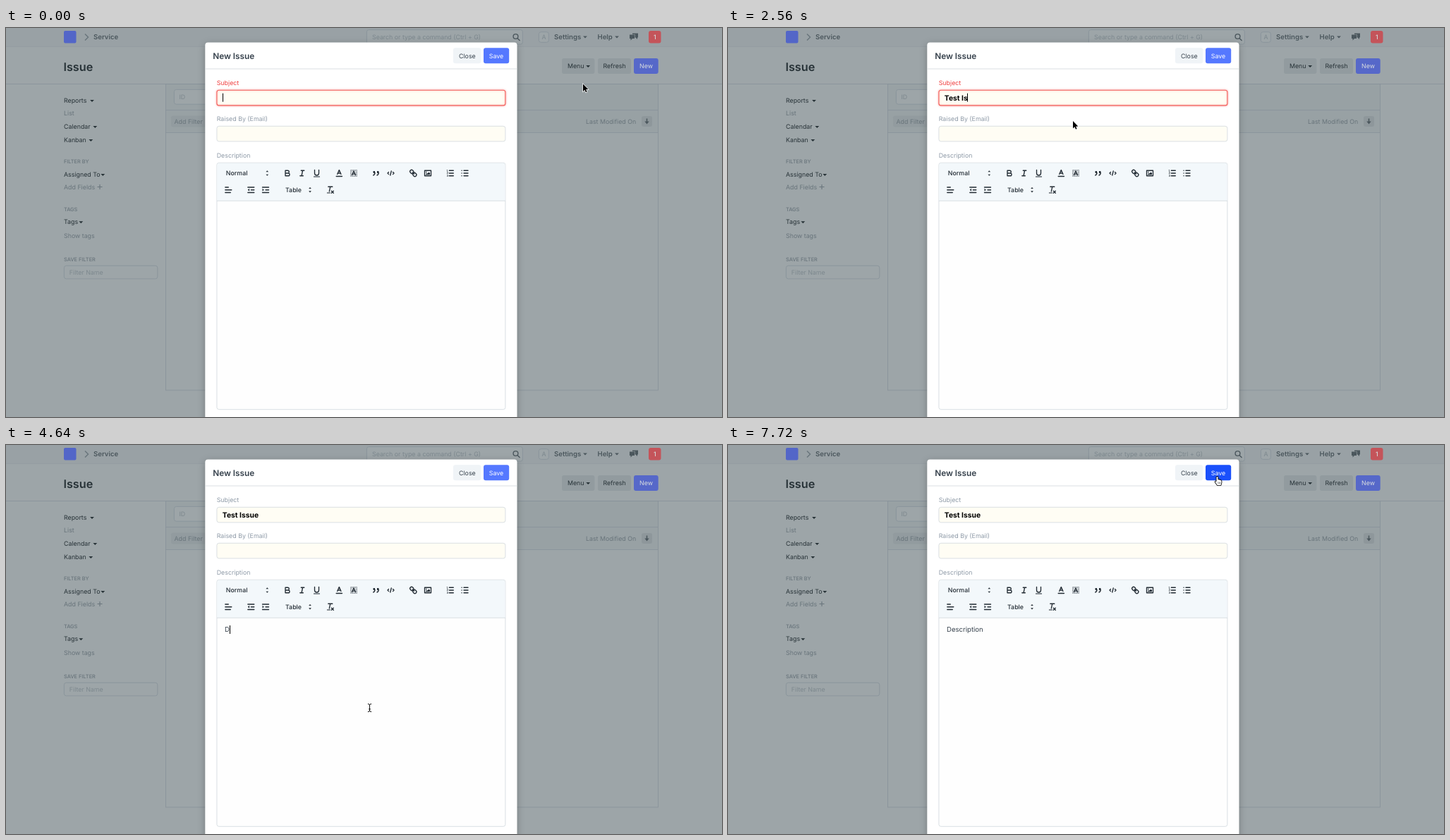
Animation, 1015 px wide and 552 px high, one loop 8000 ms. Source, as an HTML page with a canvas:

```html
<!DOCTYPE html>
<html lang="en">
<head>
<meta charset="utf-8">
<title>New Issue</title>
<style>
html, body { margin: 0; width: 100%; height: 100%; overflow: hidden; background: #9da5a8; }
canvas { display: block; width: 1015px; height: 552px; }
</style>
</head>
<body>
<canvas id="stage"></canvas>
<script>
const W = 1015, H = 552, LOOP = 8000;
const canvas = document.getElementById('stage');
const ctx = canvas.getContext('2d');
const ratio = window.devicePixelRatio || 1;
canvas.width = W * ratio;
canvas.height = H * ratio;

const SMALL = 8.84;
const DIM = { page: '#9da5a8', nav: '#99a1a5', panel: '#98a1a4', line: '#87929a', dark: '#273237',
  mid: '#4b575d', gray: '#68747b', faint: '#7d888e', button: '#929b9f' };
const INK = '#36414c', LABEL = '#8d99a6', BORDER = '#d1d8dd', RED = '#f03e3e';

// Timelines: each entry holds from its time until the next one.
const subjectLen = [[0, 0], [1070, 1], [1220, 2], [1520, 4], [1670, 5], [2410, 6], [2560, 7], [2710, 9], [2860, 10]];
const bodyLen = [[0, 0], [4640, 1], [4780, 2], [5080, 3], [5230, 4], [5370, 5], [5520, 6], [5810, 7],
  [5960, 8], [6100, 9], [6250, 10], [6550, 11]];
const caretIn = [[0, 'subject'], [300, ''], [1070, 'subject'], [2260, ''], [2410, 'subject'], [3150, ''],
  [3750, 'body'], [4190, ''], [4640, 'body'], [6840, '']];
const pointer = [[0, 818, 79.5, 'arrow'], [150, 690, 128, 'arrow'], [300, 548, 138, 'arrow'], [480, 489, 132, 'arrow'],
  [3150, 495, 190, 'arrow'], [3300, 512, 322, 'beam'], [3450, 515.5, 373, 'beam'], [6990, 550, 383, 'beam'],
  [7130, 660, 335, 'beam'], [7280, 738, 205, 'arrow'], [7430, 742, 92, 'arrow'], [7570, 708, 45, 'hand'],
  [7720, 692.5, 44.5, 'hand']];

function at(track, t) {
  let found = track[0];
  for (const step of track) if (step[0] <= t) found = step;
  return found;
}

function setFont(size, weight) {
  ctx.font = `${weight} ${size}px Inter, "Liberation Sans", sans-serif`;
}

function text(s, x, y, color, size = SMALL, weight = 400) {
  setFont(size, weight);
  ctx.fillStyle = color;
  ctx.fillText(s, x, y + size * 0.36);
}

function box(x, y, w, h, fill, stroke, r = 3, lw = 0.8) {
  ctx.beginPath();
  ctx.roundRect(x, y, w, h, r);
  if (fill) { ctx.fillStyle = fill; ctx.fill(); }
  if (stroke) { ctx.strokeStyle = stroke; ctx.lineWidth = lw; ctx.stroke(); }
}

function rect(x, y, w, h, color) {
  ctx.fillStyle = color;
  ctx.fillRect(x, y, w, h);
}

function shape(d, fill, stroke, lw = 1) {
  const p = new Path2D(d);
  if (stroke) { ctx.strokeStyle = stroke; ctx.lineWidth = lw; ctx.stroke(p); }
  if (fill) { ctx.fillStyle = fill; ctx.fill(p); }
}

function placed(x, y, scale, draw) {
  ctx.save();
  ctx.translate(x, y);
  ctx.scale(scale, scale);
  draw();
  ctx.restore();
}

function dropMark(x, y, color) {
  placed(x, y, 1, () => shape('M-2.9-1.4H2.9L0 1.6Z', color));
}

function drawNav() {
  rect(0, 0, W, 26, DIM.nav);
  rect(0, 26, W, 0.7, '#919a9f');
  box(82, 4, 17.5, 17.5, '#5366c8', null, 2);
  shape('M112 8.5L116.5 13L112 17.5', null, DIM.gray, 1.4);
  text('Service', 124, 13, DIM.mid, 9.58, 600);
  box(511.4, 2.5, 221, 20.5, DIM.page, DIM.line);
  text('Search or type a command (Ctrl + G)', 519, 13, DIM.faint);
  ctx.beginPath();
  ctx.arc(722.5, 12, 3.4, 0, 7);
  ctx.moveTo(725, 14.6);
  ctx.lineTo(728.5, 18);
  ctx.strokeStyle = DIM.mid;
  ctx.lineWidth = 1.4;
  ctx.stroke();
  box(755.4, 5.7, 14, 14.6, DIM.page, DIM.line);
  text('A', 759.4, 13, DIM.faint);
  text('Settings', 777, 13, DIM.mid, 9.58, 600);
  dropMark(821, 13, DIM.mid);
  text('Help', 838.5, 13, DIM.mid, 9.58, 600);
  dropMark(866, 13, DIM.mid);
  shape('M888 7.5H896V13.5H895V16L892.5 13.5H888Z', DIM.mid);
  shape('M884 9.5H891V15H888L885.5 17.5V15H884Z', DIM.mid, DIM.nav, 1.2);
  box(911, 4, 17.5, 17.5, '#c4545a', null, 3);
  text('1', 918, 13, '#d6dadb', SMALL, 500);
}

function drawHead() {
  text('Issue', 81.5, 55, DIM.dark, 16.2, 600);
  box(788, 43, 46.5, 22, DIM.button);
  text('Menu', 796, 54, DIM.dark);
  dropMark(825.2, 54.3, DIM.dark);
  box(839, 43, 47, 22, DIM.button);
  text('Refresh', 846.5, 54, DIM.dark);
  box(890, 43, 34.7, 22, '#5668c9');
  text('New', 898, 54, '#d9dddf');
  rect(0, 79, W, 0.8, DIM.line);
}

function drawSidebar() {
  [['Reports', 102.7, 122], ['Calendar', 139.7, 126.3], ['Kanban', 158.7, 120.3], ['Assigned To', 207.7, 137.3],
    ['Tags', 275, 106.3]].forEach(([s, y, x]) => {
    text(s, 82, y, DIM.dark);
    dropMark(x, y + 0.6, DIM.dark);
  });
  [['List', 121], ['Add Fields', 225.5], ['Show tags', 295]].forEach(([s, y]) => text(s, 82, y, DIM.gray));
  shape('M129.5 225.5H136.5M133 222V229', null, DIM.gray, 1.1);
  [['FILTER BY', 189.6], ['TAGS', 257], ['SAVE FILTER', 328.5]].forEach(([s, y]) =>
    text(s, 82, y, DIM.gray, 7.37, 500));
  box(82.4, 337.3, 132.4, 18.6, DIM.page, DIM.line);
  text('Filter Name', 89.8, 347, DIM.faint);
}

function drawList() {
  rect(226.5, 80, 698, 68, DIM.panel);
  ctx.strokeStyle = DIM.line;
  ctx.lineWidth = 0.8;
  ctx.strokeRect(226.5, 79.5, 698, 434.5);
  rect(226.5, 116, 698, 0.8, DIM.line);
  rect(226.5, 148, 698, 0.8, DIM.line);
  box(238.4, 87.4, 100, 20.8, DIM.page, DIM.line);
  text('ID', 245.5, 98, DIM.faint);
  box(234, 124.5, 70, 16, DIM.button);
  text('Add Filter', 238.5, 132.8, DIM.gray);
  text('Last Modified On', 822, 132.8, DIM.gray);
  box(901, 125, 15, 15, '#8e979b');
  shape('M908.5 128.5V134', null, DIM.mid, 1.6);
  shape('M905.3 132.5H911.7L908.5 136.5Z', DIM.mid);
}

function quillIcon(x, y, strokes, fills) {
  placed(x - 6.75, y - 6.75, 0.75, () => {
    ctx.lineCap = ctx.lineJoin = 'round';
    if (strokes) shape(strokes, null, '#222b33', 1.8);
    if (fills) shape(fills, '#222b33');
  });
}

function drawToolbar() {
  const a = 206, b = 229.7;
  const sorter = 'M6.5 11.2H11.5L9 14ZM6.5 6.8H11.5L9 4Z';
  text('Normal', 311.8, a, '#222b33', SMALL, 500);
  quillIcon(370.3, a, '', sorter);
  quillIcon(399, a, 'M5 4H9.5A2.5 2.5 0 0 1 9.5 9H5ZM5 9H10.5A2.5 2.5 0 0 1 10.5 14H5Z');
  quillIcon(419.8, a, 'M7 4H13M5 14H11M8 14L10 4');
  quillIcon(440.5, a, 'M5 3V9A4 4 0 0 0 13 9V3', 'M3 15H15V16.4H3Z');
  quillIcon(472.3, a, 'M5.5 11L9 3L12.5 11M11.6 9H6.4M3.5 15H14.5');
  placed(493, a, 1, () => {
    ctx.setLineDash([0.9, 0.9]);
    ctx.strokeStyle = '#4b545c';
    ctx.lineWidth = 0.9;
    ctx.strokeRect(-4.5, -4.5, 9, 9);
    ctx.strokeRect(-3.2, -3.2, 6.4, 6.4);
  });
  quillIcon(493, a, 'M5.7 12.5L9 5L12.3 12.5M11.3 10.5H6.7');
  quillIcon(524.5, a, 'M4.8 6H6.2V8H4.8ZM11.8 6H13.2V8H11.8ZM7 8C7 12 4 13 4 13M14 8C14 12 11 13 11 13',
    'M4 5H7V8H4ZM11 5H14V8H11Z');
  quillIcon(545.5, a, 'M5 7L3 9L5 11M13 7L15 9L13 11M10 5L8 13');
  placed(577.3, a, 0.75, () => {
    ctx.rotate(Math.PI / 4);
    box(-7.4, -3, 7.4, 6, null, '#222b33', 3, 1.8);
    box(0, -3, 7.4, 6, null, '#222b33', 3, 1.8);
    shape('M-3 0H3', null, '#222b33', 1.8);
  });
  quillIcon(598, a, 'M3 4H15V14H3Z', 'M5 12V11L7 9L8 10L11 7L13 9V12ZM5 6H7V8H5Z');
  const rows = 'M7 4H15M7 9H15M7 14H15';
  quillIcon(629.8, a, rows);
  ['1', '2', '3'].forEach((n, i) => text(n, 624.4, a - 3.8 + i * 3.8, '#222b33', 4, 600));
  quillIcon(650.5, a, rows + 'M3 4H3.1M3 9H3.1M3 14H3.1');
  quillIcon(315.3, b, 'M3 9H15M3 14H13M3 4H9');
  const dent = 'M3 4H15M9 9H15M3 14H15';
  quillIcon(347.3, b, dent, 'M6 6.5V11.5L2.8 9Z');
  quillIcon(368, b, dent, 'M3 6.5V11.5L6.2 9Z');
  text('Table', 396, b, '#222b33', SMALL, 500);
  quillIcon(431, b, '', sorter);
  quillIcon(459.8, b, 'M5 3H13M9 3L7 12M11 11L15 15M15 11L11 15', 'M2.5 14H9V15.4H2.5Z');
}

function field(y, stroke, glow) {
  ctx.save();
  if (glow) { ctx.shadowColor = `rgba(240,62,62,${glow})`; ctx.shadowBlur = 3 * ratio; }
  box(298.9, y + 0.3, 409, 21.6, '#fffdf4', stroke, 3, glow ? 1.1 : 0.8);
  ctx.restore();
}

function caretAfter(s, x, y, size, weight) {
  setFont(size, weight);
  rect(Math.round(x + ctx.measureText(s).width - 0.3), y - 6, 1, 12, '#000');
}

function drawModal(t) {
  ctx.save();
  ctx.shadowColor = 'rgba(0,0,0,.25)';
  ctx.shadowBlur = 11 * ratio;
  ctx.shadowOffsetY = 3 * ratio;
  box(282.3, 20.5, 442.2, 560, '#fff', null, 4);
  ctx.restore();
  text('New Issue', 293.2, 40, INK, 11.8, 600);
  box(634, 28.3, 39.3, 22, '#f0f4f7');
  text('Close', 642, 39.7, INK);
  box(677, 28.3, 36.2, 22, t >= 7570 ? '#1a50fb' : '#5578ff');
  text('Save', 684.8, 39.7, '#fff');
  rect(282.3, 57.6, 442.2, 0.8, BORDER);

  const focus = t < 3750 ? 1 : t < 3890 ? 0.5 : 0;
  text('Subject', 298.7, 78, focus === 1 ? RED : LABEL);
  field(88, focus === 1 ? '#f4605c' : focus ? '#e29c9d' : BORDER, focus * 0.4);
  text('Raised By (Email)', 298.7, 129, LABEL);
  field(139, BORDER, 0);
  text('Description', 298.7, 181, LABEL);

  box(298.9, 191.3, 409, 350, '#fefefe', BORDER);
  ctx.beginPath();
  ctx.roundRect(299.3, 191.7, 408.2, 53.3, [3, 3, 0, 0]);
  ctx.fillStyle = '#f3f8fb';
  ctx.fill();
  rect(299, 244.8, 409, 0.8, BORDER);
  drawToolbar();

  const subject = 'Test Issue'.slice(0, at(subjectLen, t)[1]);
  const body = 'Description'.slice(0, at(bodyLen, t)[1]);
  const caret = at(caretIn, t)[1];
  text(subject, 306.8, 99, '#000', 10.32, 700);
  text(body, 310, 262, INK, 9.58);
  if (caret === 'subject') caretAfter(subject, 306.8, 98.7, 10.32, 700);
  if (caret === 'body') caretAfter(body, 310, 262, 9.58, 400);

  if (t >= 770 && t < 1070) {
    box(489.4, 147.4, 42.8, 13.4, '#ececec', '#b9b9b9', 1);
    text('raised_by', 492, 154, '#222', 8.1, 500);
  }
}

const cursors = {
  arrow() {
    shape('M0 0V10.5L2.4 8.3L4 11.8L5.6 11.1L4.1 7.8L7.3 7.6Z', '#000', '#fff', 1.3);
  },
  beam() {
    const d = 'M-2.6-5.6Q0-5.6 0-4V4Q0 5.6-2.6 5.6M2.6-5.6Q0-5.6 0-4M2.6 5.6Q0 5.6 0 4M-1.4 1.8H1.4';
    shape(d, null, '#fff', 2);
    shape(d, null, '#111', 1);
  },
  hand() {
    shape('M0 1Q1 0 2 1V4.7Q3.4 4 4 5Q5.2 4.6 5.6 5.6Q7 5.4 7 7V9L6 12.5H1.2L-1.8 8.2Q-2 6.8-.6 7L0 7.6Z',
      '#fff', '#000', 1.7);
    shape('M2.3 8V10.5M3.8 8V10.5M5.2 8V10.5', null, '#333', 0.5);
  }
};

function draw(now) {
  const t = now % LOOP;
  ctx.setTransform(ratio, 0, 0, ratio, 0, 0);
  ctx.textRendering = 'geometricPrecision';
  rect(0, 0, W, H, DIM.page);
  drawNav();
  drawList();
  drawHead();
  drawSidebar();
  drawModal(t);
  const [, x, y, kind] = at(pointer, t);
  placed(x, y, 1, cursors[kind]);
}

const start = performance.now();
function tick() {
  draw(performance.now() - start);
  requestAnimationFrame(tick);
}
tick();
</script>
</body>
</html>
```
